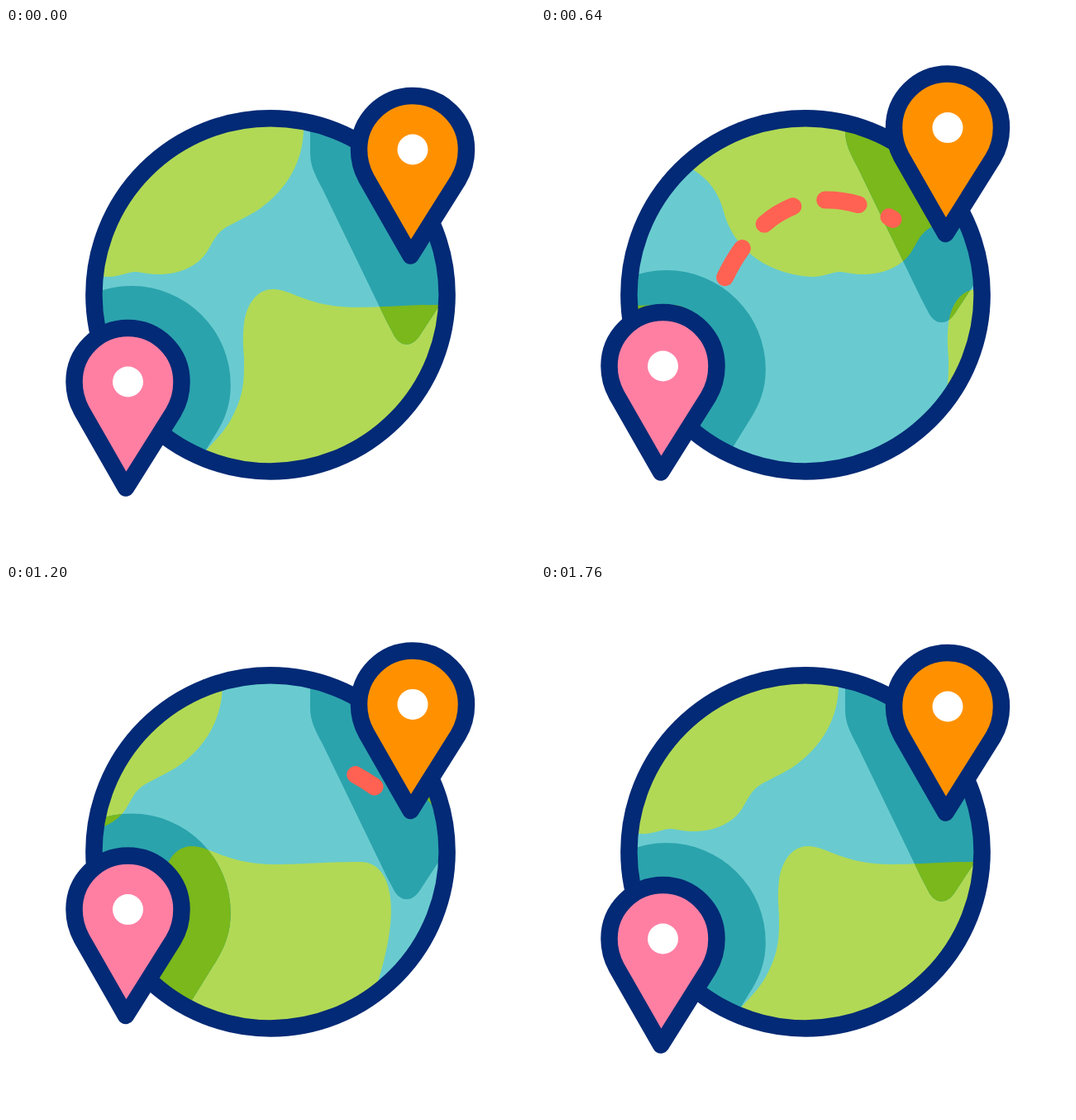
An HTML page for the animation above (2 s loop, 640 px wide and 640 px high).

```html
<!DOCTYPE html>
<html lang="en">
<head>
<meta charset="utf-8">
<title>Globe route</title>
<style>
  html, body { margin: 0; width: 100%; height: 100%; overflow: hidden; background: #fff; }
  svg { display: block; width: 100vw; height: 100vh; }
  .outline { stroke: #032a76; stroke-width: 20.5; stroke-linejoin: round; }
</style>
</head>
<body>
<svg viewBox="0 0 640 640">
  <defs>
    <clipPath id="globe"><circle cx="320" cy="322.8" r="208"/></clipPath>
    <clipPath id="shade">
      <path id="shadeA" d="M-120 0 A120 120 0 0 1 120 0 C120 26 112 44 99 64 L-5 232 L-110 50 Z"/>
      <path id="shadeB" d="M-120 0 C-120 16 -114 27 -105 44 L-28 203 L-18 222 C-10 235 3 235 12 222 L35 187 L120 60 V-140 H-120 Z"/>
    </clipPath>
    <g id="tile">
      <path d="M-68 60 V118 C-66 145 -45 152 -20 172 C-1 184 10 200 16 222 C26 262 62 297 122 301
        C140 301 145 295 158 295 C168 296 172 298 185 298 C210 298 232 288 243 271
        C252 256 255 246 272 238 C285 231 300 224 308 218 C340 195 361 160 360 118 V60 Z"/>
      <path d="M220 560 L234 524 C240 508 262 496 276 466 C289 440 288 420 288 400
        C287 385 286 375 288 357 C291 335 303 316 323 316 C346 316 365 338 425 338
        C460 338 480 335 525 335 C555 334 564 364 564 394 C564 430 550 480 533 522 L520 560 Z"/>
    </g>
    <g id="land"><use href="#tile"/><use href="#tile" x="-573"/></g>
    <g id="pin">
      <path class="outline" d="M-65 0 A65 65 0 0 1 65 0 C65 14 61 27 55 37 L-2.5 128.5 L-56 35 C-62 24 -65 13 -65 0 Z"/>
      <circle r="18.5" fill="#fff"/>
    </g>
  </defs>

  <g clip-path="url(#globe)">
    <rect width="640" height="640" fill="#69cbd0"/>
    <use class="land" href="#land" fill="#b1d955"/>
    <g clip-path="url(#shade)">
      <rect width="640" height="640" fill="#2ba3ac"/>
      <use class="land" href="#land" fill="#7ab81b"/>
    </g>
  </g>
  <circle class="outline" cx="320" cy="322.8" r="213.6" fill="none"/>
  <use id="pinA" href="#pin" fill="#ff7fa3"/>
  <use id="pinB" href="#pin" fill="#ff9100"/>
  <path id="route" pathLength="300" fill="none" stroke="#ff6252" stroke-width="21" stroke-linecap="round"
    d="M212 327 C240 250 290 208 345 208 C385 208 420 226 446 244"/>
</svg>
<script>
  const LOOP = 2000, STEP = 40, ROUTE = 300, DASH = 41, GAP = 40;
  const $ = id => document.getElementById(id);
  const lands = document.querySelectorAll('.land');
  const route = $('route');

  // time, lift
  const HOPS = [[0, 0], [240, 68], [520, 0], [760, 38], [1000, 0], [1240, 38], [1480, 0]];
  // time, distance, speed
  const SPIN = [[0, 0, 0], [280, 55, .35], [640, 205, .455], [880, 320, .495],
                [1040, 398, .49], [1360, 535, .28], [1720, 573, 0]];

  function ease(t, from, to) {
    const p = Math.min(1, Math.max(0, (t - from) / (to - from)));
    return (1 - Math.cos(Math.PI * p)) / 2;
  }

  function lift(t) {
    if (t <= 0) return 0;
    const i = HOPS.findIndex(k => k[0] >= t);
    if (i < 0) return 0;
    const [t0, a] = HOPS[i - 1], [t1, b] = HOPS[i];
    return a + (b - a) * ease(t, t0, t1);
  }

  function spin(t) {
    if (t <= 0) return 0;
    const i = SPIN.findIndex(k => k[0] >= t);
    if (i < 0) return SPIN[SPIN.length - 1][1];
    const [t0, a, va] = SPIN[i - 1], [t1, b, vb] = SPIN[i];
    const d = t1 - t0, p = (t - t0) / d, q = 1 - p;
    return a * q * q * (1 + 2 * p) + b * p * p * (3 - 2 * p) + d * p * q * (va * q - vb * p);
  }

  function move(el, x, y) {
    el.setAttribute('transform', `translate(${x.toFixed(2)} ${y.toFixed(2)})`);
  }

  function drawRoute(t) {
    const start = ROUTE * ease(t, 460, 1380);
    const end = ROUTE * ease(t, 100, 760);
    const visible = end > start;
    route.style.display = visible ? '' : 'none';
    if (!visible) return;
    const dashes = [];
    for (let p = start; p < end; p += DASH + GAP) dashes.push(Math.min(DASH, end - p), GAP);
    dashes[dashes.length - 1] = 999;
    route.setAttribute('stroke-dasharray', dashes.join(' '));
    route.setAttribute('stroke-dashoffset', -start);
  }

  function draw(t) {
    const x = spin(t);
    lands.forEach(el => move(el, x, 0));
    const yA = 428 - lift(t), yB = 147 - lift(t - 240);
    move($('pinA'), 147.5, yA);
    move($('shadeA'), 151.8, yA + 4);
    move($('pinB'), 492, yB);
    move($('shadeB'), 488, yB + 4);
    drawRoute(t);
  }

  const begin = performance.now();
  function tick() {
    const t = (performance.now() - begin) % LOOP;
    draw(Math.floor(t / STEP) * STEP);
    requestAnimationFrame(tick);
  }
  tick();
</script>
</body>
</html>
```
